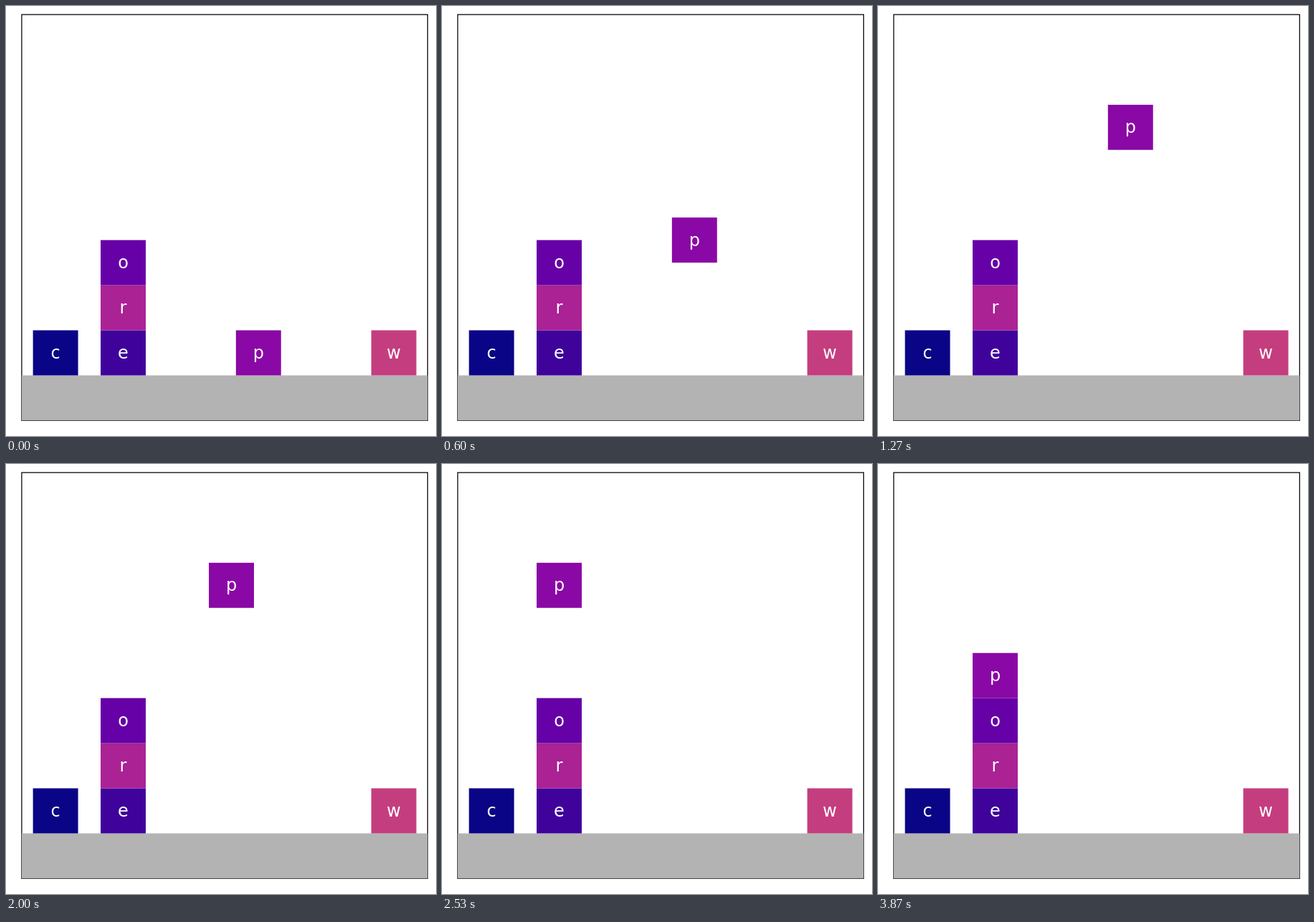
An HTML page that plays this animation: 600x600 px, repeating every 3940 ms.

```html
<!DOCTYPE html>
<html lang="en">
<head>
<meta charset="utf-8">
<title>Blocks</title>
<style>
  html, body { margin: 0; width: 100%; height: 100%; overflow: hidden; background: #fff; }
  svg { display: block; width: 600px; height: 600px; }
  text { font: 24px "DejaVu Sans", sans-serif; fill: #fff; text-anchor: middle; }
</style>
</head>
<body>
<svg id="stage" viewBox="0 0 600 600"></svg>
<script>
const NS = "http://www.w3.org/2000/svg";
const LOOP = 3940, LAST = 58;
const U = 62.935, LEFT = 21.9, TOP = 11.95, SIDE = 9 * U;
const stage = document.getElementById("stage");

function add(parent, tag, attrs) {
  const el = document.createElementNS(NS, tag);
  for (const key in attrs) el.setAttribute(key, attrs[key]);
  return parent.appendChild(el);
}

// Column 0 starts a quarter unit from the wall; level 0 rests on the ground.
const colX = col => LEFT + U * (0.25 + 1.5 * col);
const levelY = level => TOP + U * (7 - level);

function place(el, col, level) {
  el.setAttribute("transform", `translate(${colX(col)} ${levelY(level)})`);
}

function block(letter, fill, col, level) {
  const g = add(stage, "g", {});
  add(g, "rect", { width: U, height: U, fill });
  add(g, "text", { x: U / 2, y: U / 2 + 8.2 }).textContent = letter;
  place(g, col, level);
  return g;
}

add(stage, "rect", {
  x: LEFT, y: TOP, width: SIDE, height: SIDE,
  fill: "#fff", stroke: "#000", "stroke-width": 1.25
});
add(stage, "rect", { x: LEFT, y: levelY(-1), width: SIDE, height: U, fill: "#b3b3b3" });

block("c", "#0a0586", 0, 0);
block("e", "#3f039c", 1, 0);
block("r", "#aa2294", 1, 1);
block("o", "#6600a7", 1, 2);
block("w", "#c43e7f", 5, 0);
const mover = block("p", "#8a08a5", 3, 0);

// Step starts fall on a 15 Hz grid rounded to 10 ms.
const stepStart = k => 10 * Math.round(k * 20 / 3);

function stepAt(t) {
  let k = Math.floor((t + 4) * 0.015);
  if (stepStart(k) > t) k--;
  return Math.min(k, LAST);
}

// Lift five levels, wait, slide two columns, then lower two levels.
function pose(k) {
  if (k === 0) return [3, 0];
  if (k < 30) return [3, Math.min(k + 1, 20) / 4];
  if (k < 38) return [3 - (k - 28) / 5, 5];
  return [1, 5 - (k - 38) / 10];
}

function draw(t) {
  place(mover, ...pose(stepAt(t)));
}

const began = performance.now();
function tick() {
  draw((performance.now() - began) % LOOP);
  requestAnimationFrame(tick);
}
draw(0);
requestAnimationFrame(tick);
</script>
</body>
</html>
```
